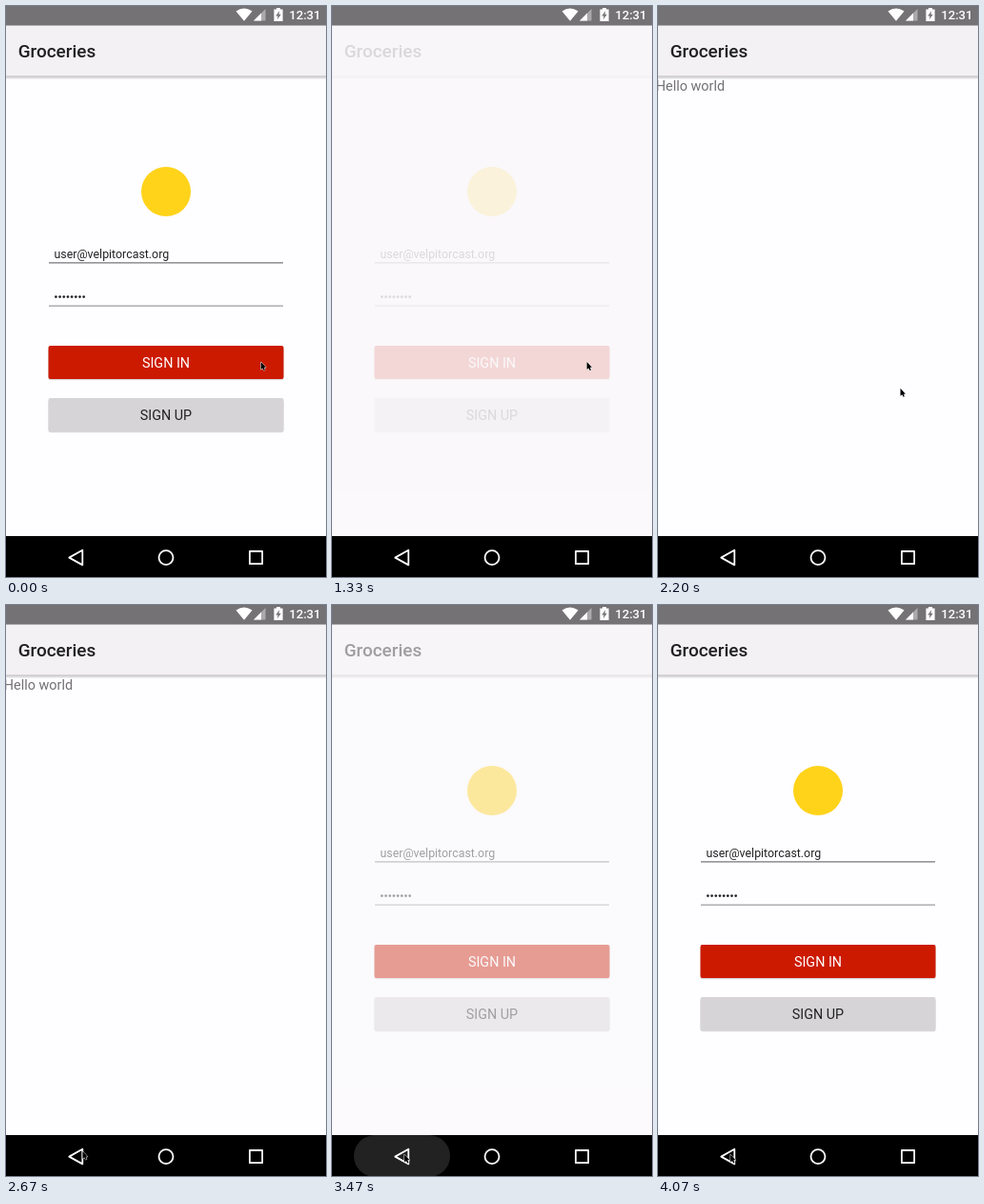
Write an HTML page that moves like this. It is 336 px wide and 600 px high and loops after 4.14 s.

```html
<!DOCTYPE html>
<html lang="en">
<head>
<meta charset="utf-8">
<title>Sign in</title>
<style>
  html, body { margin: 0; width: 100%; height: 100%; overflow: hidden; background: #000; }
  svg { display: block; width: 100vw; height: 100vh; }
  text { font-family: Roboto, "Liberation Sans", sans-serif; }
  .title { font-size: 18.95px; font-weight: 500; fill: #212022; }
  .label { font-size: 14.35px; text-anchor: middle; }
</style>
</head>
<body>
<svg viewBox="0 0 336 600">
  <defs>
    <linearGradient id="shade" x2="0" y2="1">
      <stop offset="0" stop-opacity=".24"/>
      <stop offset="1" stop-opacity="0"/>
    </linearGradient>
    <clipPath id="navClip"><rect y="557" width="336" height="43"/></clipPath>
    <g id="bar">
      <rect y="20" width="336" height="537" fill="#fefdff"/>
      <rect y="20" width="336" height="54" fill="#f3f1f4"/>
      <rect y="73.5" width="336" height="4" fill="url(#shade)"/>
      <text class="title" x="12.7" y="54">Groceries</text>
    </g>
    <g id="button">
      <rect x="44.5" y="2" width="247" height="34.3" rx="2.5" fill="#000" opacity=".15"/>
      <rect x="44.5" width="247" height="35" rx="2"/>
    </g>
  </defs>

  <rect y="20" width="336" height="537" fill="#faf8fb"/>

  <g id="login">
    <use href="#bar"/>
    <circle cx="168" cy="195" r="26" fill="#ffd31a"/>
    <text x="50.5" y="265" font-size="12.4" fill="#222">user@velpitorcast.org</text>
    <rect x="45" y="269.4" width="246" height="1" fill="#555357"/>
    <g id="dots" fill="#222"></g>
    <rect x="45" y="314.6" width="246" height="1" fill="#858387"/>
    <use href="#button" y="357" fill="#cc1a00"/>
    <text class="label" x="168" y="379.6" fill="#fff">SIGN IN</text>
    <use href="#button" y="412" fill="#d6d4d7"/>
    <text class="label" x="168" y="434.6" fill="#222">SIGN UP</text>
  </g>

  <g id="hello">
    <use href="#bar"/>
    <text x="-2.2" y="89" font-size="14.4" fill="#727073">Hello world</text>
  </g>

  <rect width="336" height="20.5" fill="#757275"/>
  <g fill="#fff">
    <path d="M241.5 5.6Q250 -0.6 258.5 5.6L250 15.8Z"/>
    <path d="M272.5 3V15.5H260Z" opacity=".4"/>
    <path d="M268 7.5V15.5H260Z"/>
    <path d="M284 3.4V2H288V3.4H290.6V16H281.4V3.4Z"/>
    <path d="M287.2 5L283.2 10.4H285.5L284.8 14.2L288.8 8.8H286.5Z" fill="#757275"/>
    <text x="297.3" y="14.3" font-size="13.07" font-weight="500">12:31</text>
  </g>

  <rect y="557" width="336" height="43"/>
  <g clip-path="url(#navClip)"><rect id="ripple" y="557" height="44" rx="22" fill="#fff"/></g>
  <g fill="none" stroke="#fff" stroke-width="1.8" stroke-linejoin="round">
    <path d="M66.3 579.6L80.3 571.8V587.4Z"/>
    <circle cx="168" cy="579.6" r="7.5"/>
    <rect x="255.9" y="573" width="13.2" height="13.2"/>
  </g>

  <path id="cursor" d="M.6 1V9L2.4 7.4L3.7 10L5 9.4L3.8 6.8H6Z"
        stroke="#fff" stroke-width="1" paint-order="stroke"/>
</svg>
<script>
const LOOP = 4140, STEP = 200 / 3, LAST_STEP = 61;
const $ = id => document.getElementById(id);
const set = (id, attrs) => {
  for (const key in attrs) $(id).setAttribute(key, attrs[key]);
};
const progress = (t, start, end) => Math.min(1, Math.max(0, (t - start) / (end - start)));
const smooth = u => (1 - Math.cos(Math.PI * u)) / 2;
const easeOut = u => 1 - (1 - u) ** 2;
const fade = (t, start) => smooth(progress(t, start, start + 150));
const bezier = (a, b, c, u) => (1 - u) ** 2 * a + 2 * u * (1 - u) * b + u * u * c;

$("dots").innerHTML = Array.from({ length: 8 }, (_, i) =>
  `<circle cx="${52.4 + 4.18 * i}" cy="305.6" r="1.35"/>`).join("");

function render(ms) {
  const t = Math.min(LAST_STEP, Math.floor((ms + 3.4) / STEP)) * STEP;

  set("login", { opacity: t < 2000 ? 1 - fade(t, 1220) : fade(t, 3400) });
  set("hello", { opacity: t < 2000 ? fade(t, 1370) : 1 - fade(t, 3260) });

  const half = 28.5 + 22 * easeOut(progress(t, 3266, 3466));
  set("ripple", {
    x: 73.5 - half,
    width: 2 * half,
    opacity: t < 3266 ? 0 : 0.2 * (1 - progress(t, 3330, 3730))
  });

  const u = easeOut(progress(t, 2133.4, 2733));
  const x = bezier(267, 253, 75.5, u), y = bezier(373, 430, 576.5, u);
  set("cursor", { transform: `translate(${x} ${y})` });
}

const origin = performance.now();
function tick() {
  render((performance.now() - origin) % LOOP);
  requestAnimationFrame(tick);
}
tick();
</script>
</body>
</html>
```
